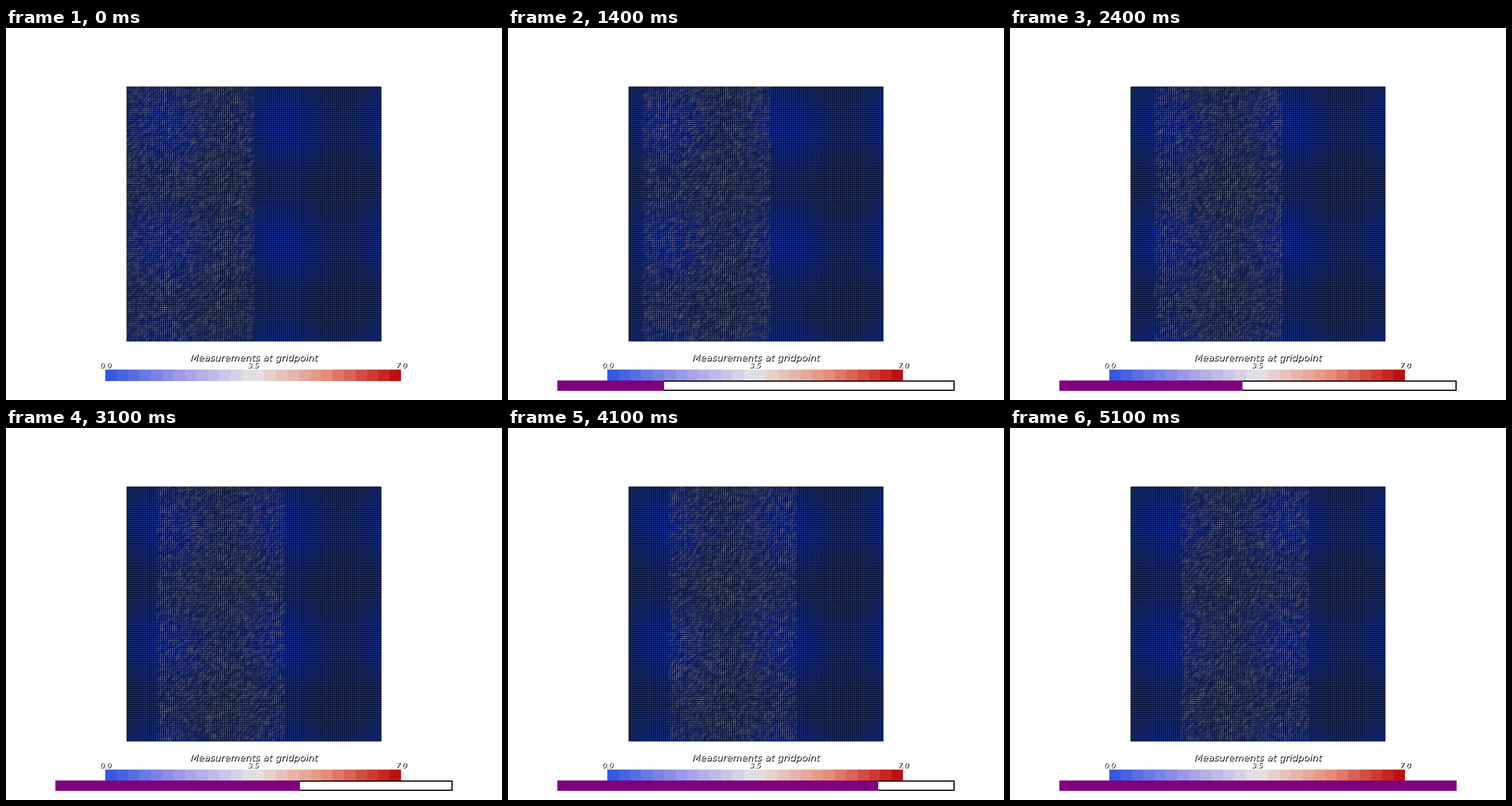
Recreate the animation shown at these times as a matplotlib script. Size 864 by 648 pixels, loop 5.2 s.

```python
import numpy as np
import matplotlib.pyplot as plt
from matplotlib.animation import FuncAnimation
from matplotlib.patches import Rectangle

W, H, DPI = 864, 648, 100
FRAMES, STEPS = 52, 26
LEFT, TOP, SIDE = 210, 102, 444
CELLS = 125
BAND = CELLS / 2               # width of the measured strip, in cells
DENSITY = 0.9                  # mean measurements per gridpoint in the strip
MAX_COUNT = 7
SCALE_X, SCALE_Y, SCALE_W, SCALE_H, SHADES = 173, 595, 515, 20, 26
BAR_X, BAR_Y, BAR_W, BAR_H = 86, 614, 692, 18

KEYS = np.array([(44, 84, 222), (155, 152, 232), (230, 228, 230),
                 (232, 140, 120), (188, 6, 8)]) / 255
EDGE = np.array([2, 8, 26]) / 255


def diverging(t):
    at = np.linspace(0, 1, len(KEYS))
    return np.stack([np.interp(t, at, channel) for channel in KEYS.T], -1)


def line_cover(distance, width):
    """Share of a pixel hidden by a soft line at this distance from its centre."""
    return np.clip(0.5 + width / 2 - distance, 0, 1)


# Pixel position inside the mesh, with the origin at the lower left.
pitch = (SIDE - 1) / CELLS
pos = np.arange(SIDE) / pitch
cell = np.minimum(pos.astype(int), CELLS - 1)
frac = pos - cell
col, row = np.meshgrid(cell, cell[::-1])
fx, fy = np.meshgrid(frac, frac[::-1])

axis_cover = line_cover(np.minimum(frac, 1 - frac) * pitch, 1.3)
cover_x, cover_y = np.meshgrid(axis_cover, axis_cover[::-1])
diagonal = 0.3 * line_cover(np.abs(fx - fy) * pitch / np.sqrt(2), 1)
visible = ((1 - cover_x) * (1 - cover_y) * (1 - diagonal))[..., None]
far, near = np.maximum(fx, fy)[..., None], np.minimum(fx, fy)[..., None]
lower = (fx > fy)[..., None]


def mesh_image(step):
    """Random measurement counts, shaded over triangles split along '/'.

    The strip moves one cell to the right with each step.
    """
    rng = np.random.default_rng(100 + step)
    n = int(DENSITY * BAND * CELLS)
    x = np.rint(step + rng.uniform(0, BAND, n)).astype(int)
    y = np.rint(rng.uniform(0, CELLS, n)).astype(int)
    counts = np.zeros((CELLS + 1, CELLS + 1))
    np.add.at(counts, (y, x), 1)
    rgb = diverging(np.minimum(counts / MAX_COUNT, 1))

    start, end = rgb[row, col], rgb[row + 1, col + 1]
    corner = np.where(lower, rgb[row, col + 1], rgb[row + 1, col])
    face = start + far * (corner - start) + near * (end - corner)
    return EDGE + (0.95 * face - EDGE) * visible


fig = plt.figure(figsize=(W / DPI, H / DPI), dpi=DPI, facecolor="white")
ax = fig.add_axes([0, 0, 1, 1])
ax.axis("off")


def box(x, y, w, h, color, **kw):
    return ax.add_patch(Rectangle((x, y), w, h, fc=color, lw=0, **kw))


def shadow_text(x, baseline, text, px):
    for shift, color in ((1.4, "black"), (0, "white")):
        ax.text(x + shift, baseline + shift, text, color=color, ha="center",
                va="baseline", family="DejaVu Sans", style="oblique",
                size=px * 72 / DPI, zorder=3)


mesh = ax.imshow(mesh_image(0), extent=(LEFT, LEFT + SIDE, TOP + SIDE, TOP),
                 interpolation="nearest", aspect="auto")
ax.set_xlim(0, W)
ax.set_ylim(H, 0)

shade_w = SCALE_W / SHADES
for k in range(SHADES):
    box(SCALE_X + k * shade_w, SCALE_Y, shade_w, SCALE_H,
        diverging((k + 0.5) / SHADES), antialiased=False)

shadow_text(432, 579.5, "Measurements at gridpoint", 16.4)
for share in (0, 0.5, 1):
    shadow_text(SCALE_X + 0.5 + share * SCALE_W, 591.5,
                f"{share * MAX_COUNT:.1f}", 13)

progress = [
    box(BAR_X, BAR_Y, BAR_W, BAR_H, "black", zorder=4),
    box(BAR_X + 2, BAR_Y + 2, BAR_W - 4, BAR_H - 4, "white", zorder=5),
    box(BAR_X, BAR_Y, 0, BAR_H, "#800080", zorder=6),
]


def draw(i):
    # The strip steps on even frames, the bar on odd ones.
    mesh.set_data(mesh_image(i // 2))
    done = (i + 1) // 2
    for part in progress:
        part.set_visible(done > 0)
    progress[-1].set_width(round(BAR_W * done / STEPS))
    return [mesh, *progress]


anim = FuncAnimation(fig, draw, frames=FRAMES, init_func=lambda: draw(0),
                     interval=100, repeat=True, repeat_delay=0)
plt.show()
```
